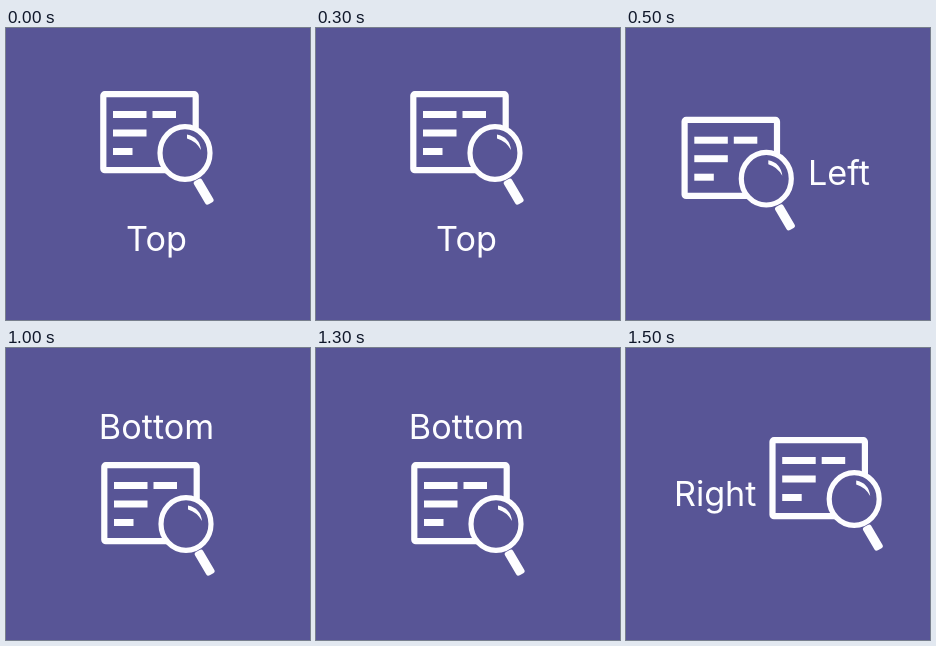
Recreate the animation shown at these times as an HTML page with a canvas. Size 304 px wide and 292 px high, loop 2000 ms.

```html
<!DOCTYPE html>
<html lang="en">
<head>
<meta charset="utf-8">
<title>Label positions</title>
<style>
  html, body { margin: 0; width: 100%; height: 100%; overflow: hidden; background: #585596; }
  canvas { display: block; }
</style>
</head>
<body>
<canvas id="stage" width="304" height="292"></canvas>
<script>
const ctx = document.getElementById('stage').getContext('2d');
const BACK = '#585596';
const INK = '#fdfdff';
const STEP = 500;

// Icon position is the top left corner; label position is the baseline centre.
const poses = [
  { label: 'Top', text: [150.5, 223], icon: [94, 63] },
  { label: 'Left', text: [213, 157], icon: [55.3, 88.7] },
  { label: 'Bottom', text: [150.5, 91], icon: [95, 114] },
  { label: 'Right', text: [89.2, 158], icon: [143.2, 89] }
];

function stroke(width, build) {
  ctx.lineWidth = width;
  ctx.beginPath();
  build();
  ctx.stroke();
}

function drawIcon(x, y) {
  ctx.save();
  ctx.translate(x, y);
  ctx.strokeStyle = ctx.fillStyle = INK;

  stroke(6.2, () => ctx.roundRect(3.3, 3.2, 92.4, 76, 1.5));
  for (const [left, top, width] of [[13, 20, 33.5], [52.5, 20, 23.5], [13, 38.5, 33.5], [13, 57, 19.5]]) {
    ctx.fillRect(left, top, width, 7);
  }

  const lens = () => ctx.ellipse(85, 62, 25, 26.3, 0, 0, Math.PI * 2);
  ctx.fillStyle = BACK;
  ctx.beginPath();
  lens();
  ctx.fill();
  stroke(5.2, lens);

  // Crescent highlight inside the lens
  ctx.fillStyle = INK;
  ctx.beginPath();
  ctx.moveTo(87, 43.5);
  ctx.quadraticCurveTo(99.5, 46, 101, 59);
  ctx.quadraticCurveTo(96, 50, 87, 47.5);
  ctx.fill();

  // Handle
  ctx.translate(96.8, 89);
  ctx.rotate(Math.atan2(22, 13));
  ctx.beginPath();
  ctx.roundRect(0, -4.6, 27, 9.2, 2.5);
  ctx.fill();
  ctx.restore();
}

function draw(time) {
  const { label, text, icon } = poses[Math.floor(time / STEP) % poses.length];
  ctx.fillStyle = BACK;
  ctx.fillRect(0, 0, 304, 292);
  drawIcon(...icon);
  ctx.fillStyle = INK;
  ctx.font = '400 34.2px Inter, sans-serif';
  ctx.textAlign = 'center';
  ctx.fillText(label, ...text);
}

function tick(now) {
  draw(now);
  requestAnimationFrame(tick);
}
draw(0);
requestAnimationFrame(tick);
</script>
</body>
</html>
```
